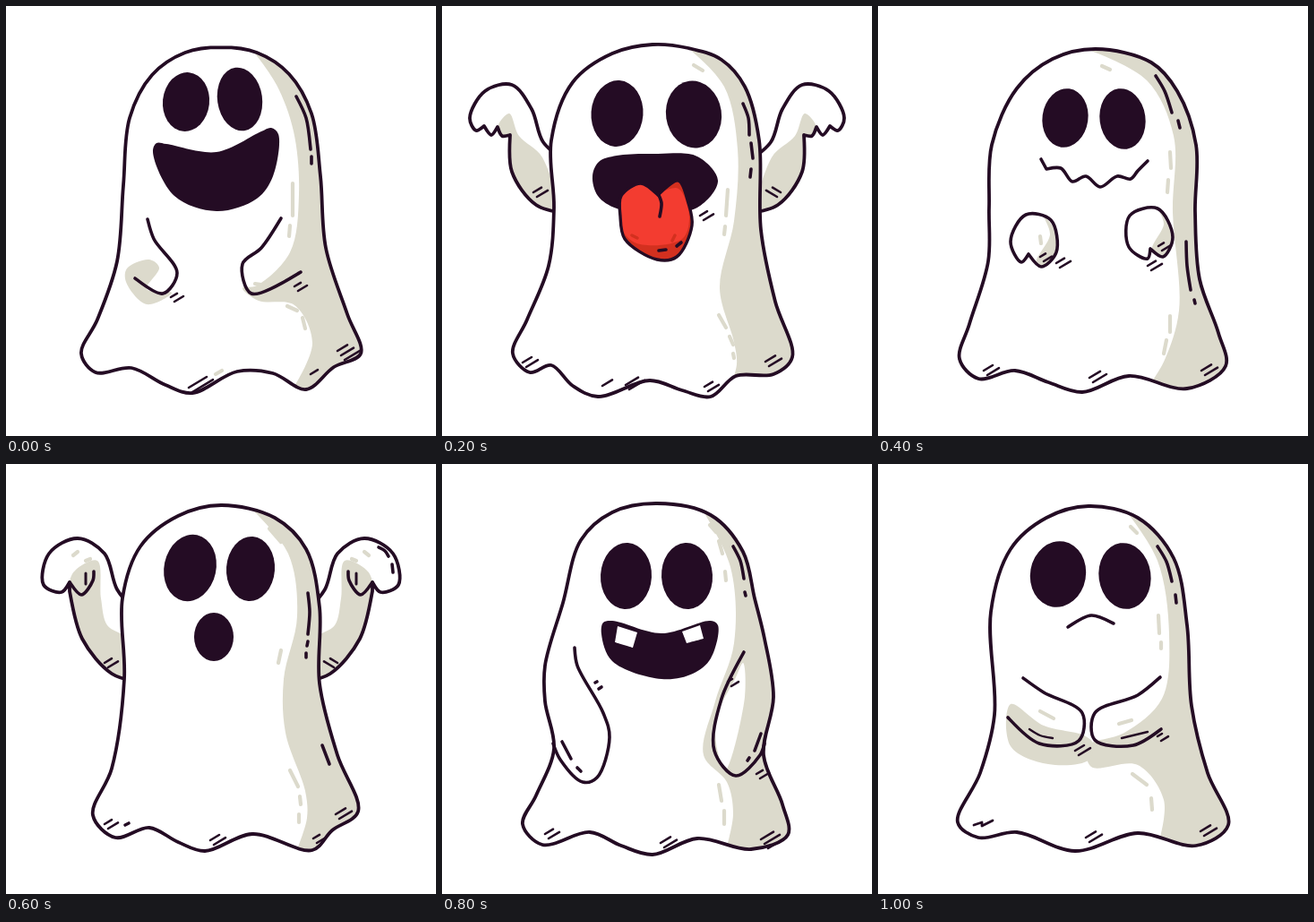
An HTML page for the animation above (1200 ms loop, 480x480 px).

```html
<!DOCTYPE html>
<html lang="en">
<head>
<meta charset="utf-8">
<title>Ghost moods</title>
<style>
  html, body { margin: 0; width: 100%; height: 100%; overflow: hidden; background: #fff; }
  svg { display: block; width: 100vw; height: 100vh; overflow: hidden; }
  path { stroke-linecap: round; stroke-linejoin: round; }
</style>
</head>
<body>
<svg viewBox="0 0 480 480"><g id="strip"></g></svg>
<script>
const INK = '#240c24', SHADE = '#dcdacc', RED = '#f33c30', DARK_RED = '#d3301f';
const HOLD = 200, SIZE = 480;
let clips = 0;

function pairs(s) {
  const n = s.trim().split(/\s+/).map(Number), out = [];
  for (let i = 0; i < n.length; i += 2) out.push([n[i], n[i + 1]]);
  return out;
}

const gap = (a, b) => Math.sqrt(Math.hypot(b[0] - a[0], b[1] - a[1])) || 1;

// Tangent of a centripetal spline at b, scaled by the step t.
function slope(a, b, c, t) {
  const u = gap(a, b), v = gap(b, c);
  return [0, 1].map(k => ((b[k] - a[k]) / u * v + (c[k] - b[k]) / v * u) / (u + v) * t / 3);
}

function run(p, loop, cmd) {
  const len = p.length;
  const at = i => loop ? p[(i + len) % len] : p[Math.max(0, Math.min(len - 1, i))];
  let d = cmd + p[0];
  for (let i = 0; i < (loop ? len : len - 1); i++) {
    const b = at(i), c = at(i + 1), t = gap(b, c);
    const m = slope(at(i - 1), b, c, t), n = slope(b, c, at(i + 2), t);
    d += `C${b.map((v, k) => v + m[k])} ${c.map((v, k) => v - n[k])} ${c}`;
  }
  return d;
}

// Points are x y pairs; "|" marks a corner.
function curve(s, closed) {
  const parts = s.split('|').map(pairs);
  const loop = closed && parts.length === 1;
  return parts.map((p, i) => run(p, loop, i ? 'L' : 'M')).join('') + (closed ? 'Z' : '');
}

const fill = (s, color = INK) => `<path d="${curve(s, true)}" fill="${color}"/>`;
const line = (s, width = 3.6, closed = false) =>
  `<path d="${curve(s, closed)}" fill="none" stroke="${INK}" stroke-width="${width}"/>`;
const eye = (x, y, rx, ry, turn = 0) =>
  `<ellipse rx="${rx}" ry="${ry}" fill="${INK}" transform="translate(${x} ${y}) rotate(${turn})"/>`;
const stroke = (x, y, dx, dy, color, width) =>
  `<path d="M${x} ${y}l${dx} ${dy}" stroke="${color}" stroke-width="${width}"/>`;
const glint = (x, y, dx, dy) => stroke(x, y, dx, dy, SHADE, 4.2);
const nib = (x, y, dx, dy) => stroke(x, y, dx, dy, INK, 3.6);

// Slanted pen strokes, each a little lower and longer than the last.
function hatch(x, y, len = 9, count = 2) {
  let out = '';
  for (let i = 0; i < count; i++) {
    const w = len + 3 * i;
    out += stroke(x + 4 * i, y + 5 * i, w, -0.6 * w, INK, 2.6);
  }
  return out;
}

function clipped(outline, inner) {
  const id = 'clip' + clips++;
  return `<clipPath id="${id}"><path d="${curve(outline, true)}"/></clipPath><g clip-path="url(#${id})">${inner}</g>`;
}

const shade = s => fill(s + ' | 440 440 440 40', SHADE);
const body = (outline, inner) =>
  fill(outline, '#fff') + clipped(outline, inner) + line(outline, 3.8, true);

function arms(outline, dark, detail) {
  const arm = fill(outline, '#fff') + clipped(outline, fill(dark, SHADE)) + line(outline, 3.8, true) + detail;
  return arm + `<g transform="matrix(-1 0 0 1 ${SIZE} 0)">${arm}</g>`;
}

function tongue(s) {
  const top = '195 195 222 194 243 206 264 204 276 235 268 260 215 264 194 235';
  return fill(s, DARK_RED) + clipped(s, fill(top, RED)) + line(s, 3.4, true)
    + line('241 209 245 220 243 235') + nib(242, 273, 8, -1) + nib(262, 268, 5, -4)
    + stroke(212, 256, 6, 3, DARK_RED, 3.5) + stroke(257, 262, 3, -6, DARK_RED, 3.5);
}

const happy = () =>
  body(`240 46 200 52 163 77 138 125 131 200 124 285 102 350 84 388 100 409 140 404 178 423 208 432
    258 408 298 410 335 428 366 403 396 388 381 344 357 270 351 190 341 120 316 76 280 52`,
    shade('278 53 302 88 321 140 327 210 317 275 280 312 264 315 282 329 322 334 342 376 320 428')
    + fill('160 283 135 293 134 308 157 333 185 320 157 316 171 292', SHADE))
  + eye(201, 107, 26, 33, 6) + eye(261, 104, 25, 35.5, -8)
  + fill('164 163 168 153 179 154 235 163 285 140 296 136 304 143 298 190 280 215 235 229 188 212')
  + line('158 238 165 260 191 298 175 321 144 304')
  + line('307 237 285 270 264 288 274 321 329 297')
  + line('324 101 335 125 340 160') + nib(341, 168, 0, 8)
  + hatch(184, 325, 7) + hatch(322, 313, 7) + hatch(204, 426, 20) + hatch(370, 385, 11, 3) + hatch(340, 411, 8, 1)
  + glint(320, 198, 0, 36) + glint(317, 245, -1, 12) + glint(278, 310, 7, 1) + glint(293, 311, 16, -7)
  + glint(314, 335, 11, 5) + glint(331, 348, 3, 12) + glint(234, 411, 7, -4);

const cheeky = () =>
  arms(`140 175 113 152 100 115 78 88 48 95 31 125 38 139 47 134 | 47 134 55 144 62 135 |
    62 135 67 145 76 144 | 76 144 78 185 105 222 140 232`,
    '62 135 75 120 86 145 112 169 128 235 100 222 78 190 74 146 66 148',
    hatch(102, 208, 9))
  + body(`235 43 190 53 146 85 122 150 125 225 119 290 95 350 79 388 98 409 122 401 146 424 174 436
    232 418 268 429 300 436 328 413 370 411 391 392 372 330 356 250 354 150 338 90 312 60 275 47`,
    shade('275 47 315 90 330 160 326 240 310 315 326 375 329 400 321 428'))
  + eye(195.5, 120, 29, 37, 4) + eye(281, 121, 31, 37.5, -8)
  + fill('168 190 175 174 195 167 240 165 285 168 308 195 285 225 240 230 195 226 174 212')
  + tongue('199 235 200 212 222 198 241 211 | 241 211 264 195 275 220 279 245 262 280 240 283 204 260 199 235')
  + line('336 109 342 125 343 144') + nib(345, 153, 2, 17) + nib(345, 182, -1, 9)
  + hatch(288, 234, 8) + hatch(179, 424, 11, 1) + hatch(205, 423, 14) + hatch(293, 425, 9)
  + hatch(90, 398, 10) + hatch(361, 397, 11)
  + glint(281, 66, 10, 6) + glint(319, 205, -2, 29) + glint(316, 246, -1, 9)
  + glint(309, 345, 8, 14) + glint(321, 369, 4, 9) + glint(325, 388, 1, 5);

const uneasy = () =>
  body(`243 48 195 59 155 92 127 155 124 225 123 285 102 355 91 394 112 416 153 407 190 420 228 431
    280 413 345 427 388 402 380 365 359 305 354 230 355 155 334 95 305 63`,
    shade('230 47 300 83 330 145 329 230 336 340 320 395 304 422'))
  + eye(209, 125, 25.5, 33, 8) + eye(273, 126, 25.5, 34, -8)
  + fill('184 233 200 257 189 290 177 286 192 255', SHADE)
  + fill('312 226 329 258 316 280 306 272 319 243', SHADE)
  + line('182 171 188 182 | 188 182 204 181 217 196 232 190 248 202 267 190 282 193 290 184 301 173')
  + line('168 277 160 286 148 263 165 233 193 239 199 275 182 291 168 277')
  + line('304 271 301 282 280 269 281 234 312 226 329 258 318 280 304 271')
  + line('310 78 320 95 328 119') + line('344 263 345 290 349 317') + nib(335, 128, 2, 8) + nib(353, 328, 1, 4)
  + hatch(181, 280, 6) + hatch(199, 287, 9) + hatch(313, 268, 6) + hatch(301, 290, 9)
  + hatch(118, 407, 10) + hatch(236, 415, 12) + hatch(361, 407, 11)
  + glint(250, 67, 9, 4) + glint(326, 163, 1, 18) + glint(324, 194, -1, 14)
  + glint(326, 346, 0, 18) + glint(322, 373, -3, 15) + glint(181, 257, 1, 8);

const spooky = () =>
  arms(`145 165 124 140 110 100 80 83 48 100 42 135 62 143 71 132 | 71 142 85 195 118 234 145 243`,
    '71 132 78 118 102 108 106 150 113 180 134 195 134 244 80 195',
    line('71 132 84 146 97 130 98 120') + line('89 122 89 134', 3) + hatch(110, 222, 8)
    + glint(75, 102, 5, -4) + glint(89, 108, 5, -2))
  + body(`240 46 192 58 150 92 130 150 132 240 118 340 97 392 122 417 160 406 192 422 222 432
    275 413 342 431 364 409 393 388 370 325 350 245 350 160 335 95 300 60`,
    shade('272 48 315 100 325 170 310 240 312 300 334 365 336 395 325 430'))
  + eye(205.5, 116, 29, 37.5, 12) + eye(273, 117, 27, 36, 4) + eye(232, 193, 22, 27)
  + line('337 144 339 165 337 190') + nib(337, 198, -1, 5) + nib(335, 211, 0, 5)
  + line('353 314 361 335') + line('416 93 423 97 427 103') + nib(431, 112, 1, 9)
  + hatch(110, 402, 8) + nib(133, 403, 4, -2) + hatch(228, 420, 10) + hatch(368, 391, 11) + hatch(343, 418, 7)
  + glint(294, 72, 13, 15) + glint(307, 208, -3, 14) + glint(317, 342, 9, 18) + glint(328, 371, 1, 9) + glint(327, 391, 0, 9);

const goofy = () =>
  body(`240 44 190 54 155 85 135 155 115 225 115 265 125 318 105 370 90 402 112 425 165 411 200 426
    235 436 285 418 345 430 386 414 380 380 359 325 370 260 360 195 349 150 336 98 300 57`,
    shade('290 50 322 115 326 200 305 265 292 325 318 355 325 390 318 427')
    + fill('336 222 338 260 316 342 305 290 328 238', '#fff'))
  + eye(205.5, 125, 28.5, 37, 3) + eye(273.5, 125, 28.5, 37, -3)
  + fill('178 190 180 177 190 175 245 189 300 175 308 180 300 217 280 234 245 240 190 220')
  + fill('196 181 | 218 188 | 213 205 193 199', '#fff') + fill('268 187 | 288 180 | 292 195 273 200', '#fff')
  + line('148 205 151 225 180 278 187 305 173 350 157 355 132 330 124 312')
  + line('337 210 312 262 304 320 328 348 355 325 360 312')
  + line('325 92 333 108 337 128') + nib(338, 143, 1, 4)
  + line('134 310 144 329') + nib(151, 339, 4, 4) + line('356 301 349 320') + nib(343, 328, -2, 3)
  + nib(171, 244, 2, -1) + nib(175, 251, 3, -2) + hatch(319, 243, 5) + hatch(351, 346, 7)
  + hatch(115, 413, 9) + hatch(244, 423, 11) + hatch(356, 419, 14, 3)
  + glint(299, 68, 7, 8) + glint(309, 86, 4, 14) + glint(316, 120, 1, 10) + glint(309, 358, 3, 18) + glint(315, 387, 0, 15);

const gloomy = () =>
  body(`235 47 188 60 148 95 126 165 130 280 114 345 89 400 112 417 155 411 220 432 290 412 355 426
    391 403 368 345 350 270 345 180 330 105 290 60`,
    shade('276 51 312 108 325 190 317 262 275 300 234 315 238 338 290 336 319 375 314 421')
    + fill('148 268 185 292 230 303 240 312 236 330 190 335 148 315', SHADE))
  + eye(201, 123, 31, 37, 10) + eye(275.5, 125, 29, 37, -8)
  + line('212 182 238 169 263 178')
  + line('162 239 185 255 228 278 224 309 180 312 145 283')
  + line('315 238 290 258 242 278 242 308 285 314 316 296')
  + line('312 92 322 109 328 131') + nib(332, 146, 1, 9)
  + line('169 296 181 303 195 306', 2.4) + line('272 306 301 299', 2.4)
  + hatch(220, 320, 10) + hatch(312, 304, 5) + line('107 403 | 116 400 116 404 | 128 398', 2.8)
  + hatch(232, 417, 11) + hatch(360, 410, 11)
  + glint(282, 70, 7, 7) + glint(313, 169, 1, 20) + glint(316, 199, 0, 7) + glint(181, 276, 15, 8)
  + glint(269, 290, 14, -4) + line('284 346 300 358', 4.2).replace(INK, SHADE) + glint(305, 373, 1, 13);

const moods = [happy, cheeky, uneasy, spooky, goofy, gloomy];
const strip = document.getElementById('strip');
strip.innerHTML = moods.map((draw, i) => `<g transform="translate(${i * SIZE} 0)">${draw()}</g>`).join('');

// Step through the strip one stage width at a time.
strip.animate(
  [{ transform: 'translateX(0px)' }, { transform: `translateX(${-SIZE * moods.length}px)` }],
  { duration: HOLD * moods.length, iterations: Infinity, easing: `steps(${moods.length}, end)` }
);
</script>
</body>
</html>
```
